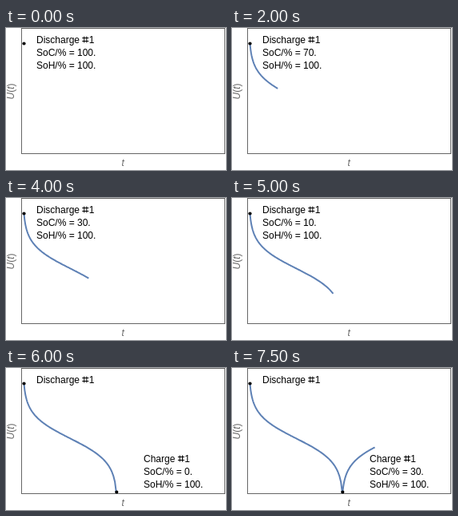
These frames come from a looping animation (275x178 px, 8000 ms). An HTML page:

```html
<!DOCTYPE html>
<html lang="en">
<head>
<meta charset="utf-8">
<title>Battery cycle</title>
<style>
html, body { margin: 0; width: 100%; height: 100%; overflow: hidden; background: #fff; }
svg { display: block; width: 275px; height: 178px; font: 12px "Liberation Sans", Arial, sans-serif; }
.axis { fill: #666; }
.axis tspan, .time { font-style: italic; }
.curve { fill: none; stroke: #5e81b5; stroke-width: 2; stroke-linejoin: round; }
.hash { fill: none; stroke: #000; stroke-width: 1; }
</style>
</head>
<body>
<svg viewBox="0 0 275 178">
  <defs>
    <clipPath id="plot"><rect x="19" y="0" width="255" height="158"/></clipPath>
    <path id="hash" class="hash" d="M.3 -6.5h8M.3 -2.5h8M2.7 -8.5v8M5.9 -8.5v8"/>
  </defs>
  <rect x="19.5" y=".5" width="254" height="157" fill="none" stroke="#666"/>
  <text class="axis" transform="translate(10 79.5) rotate(-90)" text-anchor="middle"><tspan>U</tspan>(<tspan>t</tspan>)</text>
  <text class="axis time" x="144.5" y="173">t</text>
  <g clip-path="url(#plot)">
    <path id="down" class="curve"/>
    <path id="up" class="curve"/>
  </g>
  <circle cx="22.5" cy="19.5" r="2.1"/>
  <g transform="translate(38 19)">
    <text>Discharge</text><use href="#hash" x="57"/><text x="65.7">1</text>
    <g id="downInfo"><text id="downSoc" y="16"></text><text y="32">SoH/% = 100.</text></g>
  </g>
  <g id="charge">
    <circle cx="138.3" cy="155.5" r="2.1"/>
    <g transform="translate(172 118)">
      <text>Charge</text><use href="#hash" x="42.6"/><text x="51.2">1</text>
      <text id="upSoc" y="16"></text><text y="32">SoH/% = 100.</text>
    </g>
  </g>
</svg>
<script>
const LOOP = 8000, STEP = 500;
const $ = id => document.getElementById(id);

// Cell voltage follows the log-odds of the moved charge u.
const logit = u => {
  const s = 0.01 + 0.98 * u;
  return Math.log(s / (1 - s));
};

function curve(x0, width, mid, gain, end) {
  if (end <= 0) return "";
  const n = 120;
  let d = "";
  for (let i = 0; i <= n; i++) {
    const u = end * (i / n) ** 2;
    d += (i ? "L" : "M") + (x0 + width * u).toFixed(2) + " " + (mid + gain * logit(u)).toFixed(2);
  }
  return d;
}

let last = -1;
function draw(time) {
  const step = Math.floor((time % LOOP) / STEP);
  if (step !== last) {
    last = step;
    const used = Math.min(10, Math.max(0, step - 1));
    const charging = step >= 12;
    const filled = Math.max(0, step - 12);
    $("down").setAttribute("d", curve(22.5, 115.5, 88.3, 15, used / 10));
    $("up").setAttribute("d", curve(138.3, 134, 87, 15 * -1, filled / 10));
    $("downSoc").textContent = `SoC/% = ${100 - used * 10}.`;
    $("upSoc").textContent = `SoC/% = ${filled * 10}.`;
    $("downInfo").style.display = charging ? "none" : "";
    $("charge").style.display = charging ? "" : "none";
  }
}

const start = performance.now();
function tick() {
  draw(performance.now() - start);
  requestAnimationFrame(tick);
}
tick();
</script>
</body>
</html>
```
